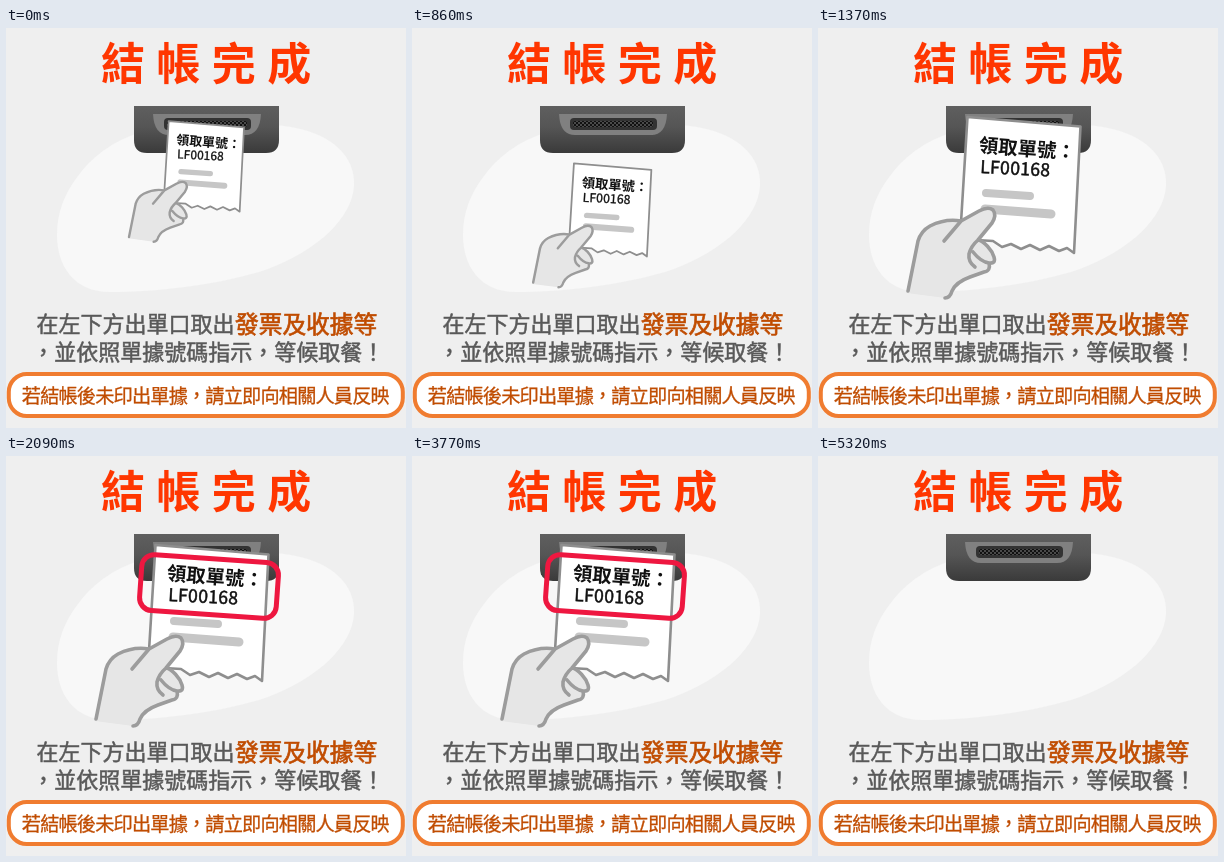
These frames come from a looping animation (400 px wide and 400 px high, 6080 ms). An HTML page:

```html
<!DOCTYPE html>
<html lang="zh-Hant">
<head>
<meta charset="utf-8">
<style>
  html, body { margin: 0; height: 100%; overflow: hidden; background: #efefef; }
  svg { display: block; width: 100%; height: 100%; }
  /* a thin stroke turns the regular weight into a medium one */
  text { font-family: "Noto Sans CJK TC", "Noto Sans CJK", "Noto Sans", sans-serif; stroke-width: .5px; }
  .title { font-size: 44px; font-weight: 700; letter-spacing: 11.4px; fill: #ff3600; }
  .body { font-size: 22px; fill: #595959; stroke: #595959; }
  .accent { fill: #c04c00; stroke: #c04c00; }
  .big { font-size: 23.7px; stroke-width: .7px; }
  .note { font-size: 19.2px; letter-spacing: -.83px; stroke-width: .3px; }
  .ticket { fill: #111; }
  .code { font-size: 17.6px; letter-spacing: .3px; stroke: #111; }
  .line { fill: none; stroke-linecap: round; stroke-linejoin: round; }
</style>
</head>
<body>
<svg viewBox="0 0 400 400">
  <defs>
    <linearGradient id="metal" x2="0" y2="1">
      <stop offset="0" stop-color="#5f5f5f"/>
      <stop offset=".45" stop-color="#555"/>
      <stop offset="1" stop-color="#3a3a3a"/>
    </linearGradient>
    <pattern id="mesh" width="4" height="4" patternUnits="userSpaceOnUse">
      <path d="M0 0h2v2h-2zM2 2h2v2h-2z" fill="#4a4a4a"/>
    </pattern>
  </defs>

  <path fill="#f8f8f8" d="M348 158C346 190 312 222 262 241C215 257 150 264 104 264C68 264 51 238 51 207C51 185 58 166 72 148C88 126 112 110 140 103C185 94 250 92 290 100C325 107 350 128 348 158Z"/>

  <!-- printer -->
  <path fill="url(#metal)" d="M128 78H273V112Q273 125 260 125H141Q128 125 128 112Z"/>
  <path fill="#808080" d="M147 86H255Q254 107 239 107H163Q148 107 147 86Z"/>
  <rect x="158" y="90" width="87" height="12" rx="4" fill="#333"/>
  <rect x="161" y="93" width="80" height="6" rx="2" fill="#111"/>
  <rect x="161" y="93" width="80" height="6" rx="2" fill="url(#mesh)"/>

  <!-- ticket and hand -->
  <g id="slip">
    <path fill="#fff" stroke="#8e8e8e" stroke-width="2.6" stroke-linejoin="round"
      d="M149.5 89L262.5 98.5L256 225L249 220L241 223L231 218L222 222L212 217L203 221L193 216L184 219L175 213L142 211Z"/>
    <text class="ticket" x="160.5" y="124" font-size="19.4" font-weight="700" transform="rotate(4.3 160.5 124)">領取單號：</text>
    <text class="ticket code" x="162" y="145" transform="rotate(2.8 162 145)">LF00168</text>
    <path class="line" stroke="#c6c6c6" stroke-width="8" d="M168 165L212 168"/>
    <path class="line" stroke="#c6c6c6" stroke-width="9" d="M167 181L233 186"/>
    <path fill="#e6e6e6" d="M89 265L100 213Q103 203 112 198C122 193 132 191 143 193L161 183Q170 178 175 182Q179 187 174 195L160 212C166 213 174 222 176 229Q178 236 171 235Q173 243 166 244L152 249Q138 254 134 263Q132 270 127 270Z"/>
    <path class="line" stroke="#9c9c9c" stroke-width="3.6" d="M90 263L100 213Q103 203 112 198C122 193 132 191 143 193L161 183Q170 178 175 182Q179 187 174 195L160 212C166 213 174 222 176 229Q178 236 171 235Q173 243 166 244L152 249Q138 254 134 263Q132 270 127 270M143 193L126 213M171 235Q163 234 155 224M160 212Q153 218 151 226Q150 234 157 239"/>
  </g>

  <rect id="mark" class="line" x="134.5" y="102.5" width="137" height="56" rx="12.5"
    stroke="#ee1740" stroke-width="5" transform="rotate(4 203 130.5)"/>

  <text class="title" x="95" y="51.6">結帳完成</text>
  <text class="body" x="30.4" y="304.3">在左下方出單口取出</text>
  <text class="accent big" x="229" y="304.7">發票及收據等</text>
  <text class="body" x="26.3" y="331.8">，並依照單據號碼指示，等候取餐！</text>
  <rect x="2.8" y="346" width="394" height="42" rx="18" fill="#fff" stroke="#f07c30" stroke-width="4"/>
  <text class="accent note" x="15.8" y="374.8">若結帳後未印出單據，請立即向相關人員反映</text>
</svg>
<script>
  const LOOP = 6080, STEP = 30, GONE = 5320;
  const flashes = [[2090, 2460], [2850, 3220], [3770, GONE]];
  const slip = document.getElementById('slip');
  const mark = document.getElementById('mark');
  const clamp = v => Math.max(0, Math.min(1, v));
  const show = (el, on) => el.setAttribute('visibility', on ? 'visible' : 'hidden');

  function draw(t) {
    const drop = clamp(Math.floor(t / STEP) / 22);
    const zoom = clamp((Math.floor((t - 860) / STEP) + 1) / 18);
    const x = 63 * (1 - zoom);
    const y = 78.7 * (1 - zoom) - 45 * (1 - drop);
    slip.setAttribute('transform', `translate(${x} ${y}) scale(${(2 + zoom) / 3})`);
    show(slip, t < GONE);
    show(mark, flashes.some(([on, off]) => t >= on && t < off));
  }

  const start = performance.now();
  function tick() {
    draw((performance.now() - start) % LOOP);
    requestAnimationFrame(tick);
  }
  tick();
</script>
</body>
</html>
```
